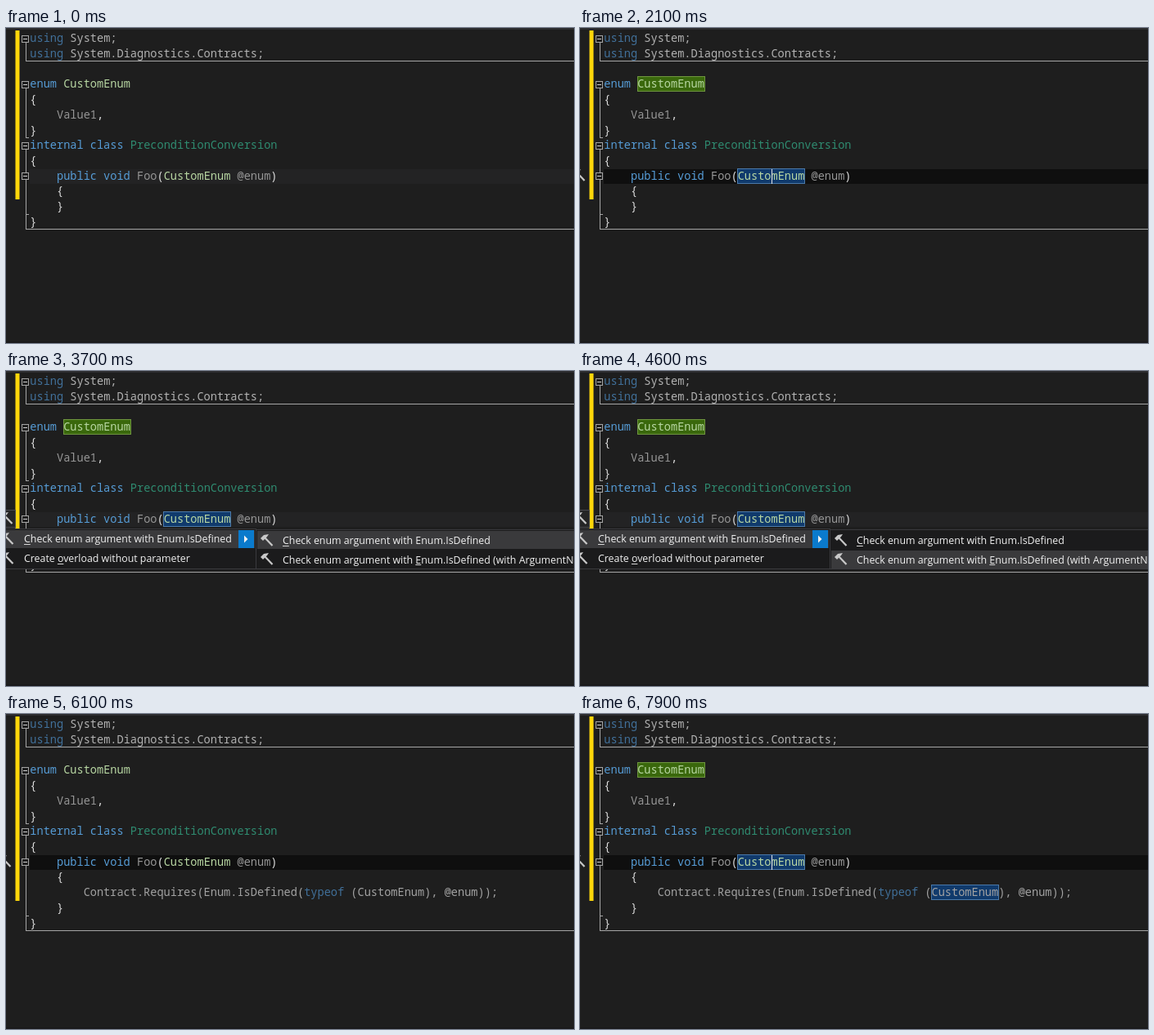
Recreate the animation shown at these times as an HTML page with a canvas. Size 694 by 386 pixels, loop 8000 ms.

```html
<!DOCTYPE html>
<html lang="en">
<head>
<meta charset="utf-8">
<title>Code editor quick action</title>
<style>
  html, body { margin: 0; width: 100%; height: 100%; overflow: hidden; background: #1e1e1e; }
  canvas { display: block; }
</style>
</head>
<body>
<canvas id="stage" width="694" height="386"></canvas>
<script>
const ctx = document.getElementById('stage').getContext('2d');
const W = 694, H = 386, LOOP = 8000;
const ROW = 18.72, COL = 8.168, LEFT = 29.3;
const CODE_FONT = '13.61px "Noto Sans Mono", monospace';
const MENU_FONT = '12.36px "Open Sans", sans-serif';

const color = {
  key: '#569cd6', dimKey: '#41709a', text: '#dcdcdc', using: '#b2b2b2',
  dim: '#969696', type: '#b8d7a3', cls: '#2f8b70', body: '#a2a2a2'
};

// Each line is a list of [text, color name] runs.
const head = [
  [['using', 'dimKey'], [' System;', 'using']],
  [['using', 'dimKey'], [' System.Diagnostics.Contracts;', 'using']],
  [],
  [['enum ', 'key'], ['CustomEnum', 'type']],
  [['{', 'text']],
  [['    Value1', 'dim'], [',', 'text']],
  [['}', 'text']],
  [['internal class ', 'key'], ['PreconditionConversion', 'cls']],
  [['{', 'text']],
  [['    public void ', 'key'], ['Foo', 'dim'], ['(', 'text'],
   ['CustomEnum ', 'type'], ['@enum', 'dim'], [')', 'text']],
  [['    {', 'text']]
];
const contract = [['        Contract.Requires(Enum.IsDefined(', 'body'], ['typeof', 'dimKey'],
  [' (CustomEnum), @enum));', 'body']];
const tail = [[['    }', 'text']], [['}', 'text']]];

const between = (t, a, b) => t >= a && t < b;
const fade = (t, from, to, ms) =>
  Math.max(0, Math.min(1, (t - from) / ms, (to - t) / ms));

function rect(x, y, w, h, fill, stroke) {
  if (fill) { ctx.fillStyle = fill; ctx.fillRect(x, y, w, h); }
  if (stroke) {
    ctx.strokeStyle = stroke;
    ctx.lineWidth = 1;
    ctx.strokeRect(x + .5, y + .5, w - 1, h - 1);
  }
}

function polygon(points, fill) {
  ctx.fillStyle = fill;
  ctx.beginPath();
  points.forEach(([x, y]) => ctx.lineTo(x, y));
  ctx.fill();
}

function drawLine(runs, row) {
  let col = 0;
  ctx.font = CODE_FONT;
  for (const [text, name] of runs) {
    ctx.fillStyle = color[name];
    ctx.fillText(text, LEFT + col * COL, 17.2 + row * ROW);
    col += text.length;
  }
}

function nameBox(row, col, fill, stroke) {
  rect(Math.floor(LEFT + col * COL), Math.floor(3.6 + row * ROW), 83, 19, fill, stroke);
}

function drawOutline(shift) {
  const line = '#a5a5a5';
  const region = (top, bottom, length) => {
    rect(24, top, 1, bottom - top, line);
    rect(24, bottom, length, 1, line);
  };
  region(17, 40, W);
  region(73, 134, 4);
  region(148, 246 + shift, W);
  rect(24, 228 + shift, 4, 1, line);
  for (const row of [0, 3, 7, 9]) {
    const y = Math.round(8.5 + row * ROW);
    rect(19, y, 9, 9, '#1e1e1e', line);
    rect(21, y + 4, 5, 1, '#d0d0d0');
  }
}

function hammer(x, y) {
  polygon([[x, y + 5], [x + 4, y + 1], [x + 10, y], [x + 8, y + 3], [x + 3, y + 8]], '#c8c8c8');
  ctx.strokeStyle = '#c8c8c8';
  ctx.lineWidth = 2.2;
  ctx.beginPath();
  ctx.moveTo(x + 5, y + 4);
  ctx.lineTo(x + 14.5, y + 14);
  ctx.stroke();
}

function menuText(text, x, y, accessIndex) {
  ctx.font = MENU_FONT;
  ctx.fillStyle = '#f1f1f1';
  ctx.fillText(text, x, y);
  const start = ctx.measureText(text.slice(0, accessIndex)).width;
  const width = ctx.measureText(text[accessIndex]).width;
  rect(x + start, Math.round(y + 1.5), width, 1, '#d8d8d8');
}

function drawMenu(submenuOpen) {
  rect(-3, 193, 309, 50, '#1b1b1c', '#3a3a3e');
  rect(0, 195, 304, 22, '#3a3a3c');
  if (submenuOpen) rect(284, 195, 19, 22, '#0a7acc');
  else rect(283, 196, 1, 20, '#2a2a2c');
  polygon([[291, 201.5], [295.5, 206], [291, 210.5]], submenuOpen ? '#f1f1f1' : '#b5b5b5');
  hammer(-6, 198);
  hammer(-6, 222);
  menuText('Check enum argument with Enum.IsDefined', 22, 210, 0);
  menuText('Create overload without parameter', 22, 234, 7);
}

function drawSubmenu(selected) {
  rect(305, 194, 400, 49, '#1b1b1c', '#3a3a3e');
  rect(307, selected ? 220 : 196, 400, 22, '#3a3a3c');
  hammer(311, 200);
  hammer(311, 223);
  menuText('Check enum argument with Enum.IsDefined', 338, 212, 0);
  menuText('Check enum argument with Enum.IsDefined (with ArgumentNullException)', 338, 235.5, 25);
}

function draw(t) {
  const inserted = t >= 5700;
  const menu = fade(t, 2350, 4950, 150);
  const submenu = fade(t, 3050, 4950, 150);
  const marked = between(t, 2000, 5700) || t >= 6950;
  const focused = between(t, 1500, 2350) || inserted;
  const caret = between(t, 1500, 2250) || between(t, 6300, 6850) || t >= 7400;
  const shift = inserted ? 19 : 0;

  rect(0, 0, W, H, '#1e1e1e');
  rect(0, 0, W, 2, '#2d2d30');
  rect(0, 384, W, 2, '#19191b');
  rect(29, 173, W, 18, focused ? '#0f0f0f' : '#232324');
  rect(11.5, 3, 5, 207 + shift, '#ffd60a');
  drawOutline(shift);

  if (marked) {
    nameBox(3, 5, '#3a680c', '#6f963f');
    nameBox(9, 20, '#103a6c', '#4b79a9');
    if (inserted) nameBox(11, 49, '#103a6c', '#4b79a9');
  }
  [...head, ...(inserted ? [contract] : []), ...tail].forEach(drawLine);
  if (caret) rect(234, 173, 1, 18, '#e4e4e4');

  if (t >= 2000) {
    if (menu > 0) rect(-8, 170, 20, 22, '#252526', '#4a4a4f');
    hammer(menu > 0 ? -7 : -9, 173);
  }
  ctx.globalAlpha = menu;
  if (menu) drawMenu(submenu > 0);
  ctx.globalAlpha = submenu;
  if (submenu) drawSubmenu(t >= 4100 ? 1 : 0);
  ctx.globalAlpha = 1;
}

const start = performance.now();
function tick() {
  draw((performance.now() - start) % LOOP);
  requestAnimationFrame(tick);
}
tick();
</script>
</body>
</html>
```
